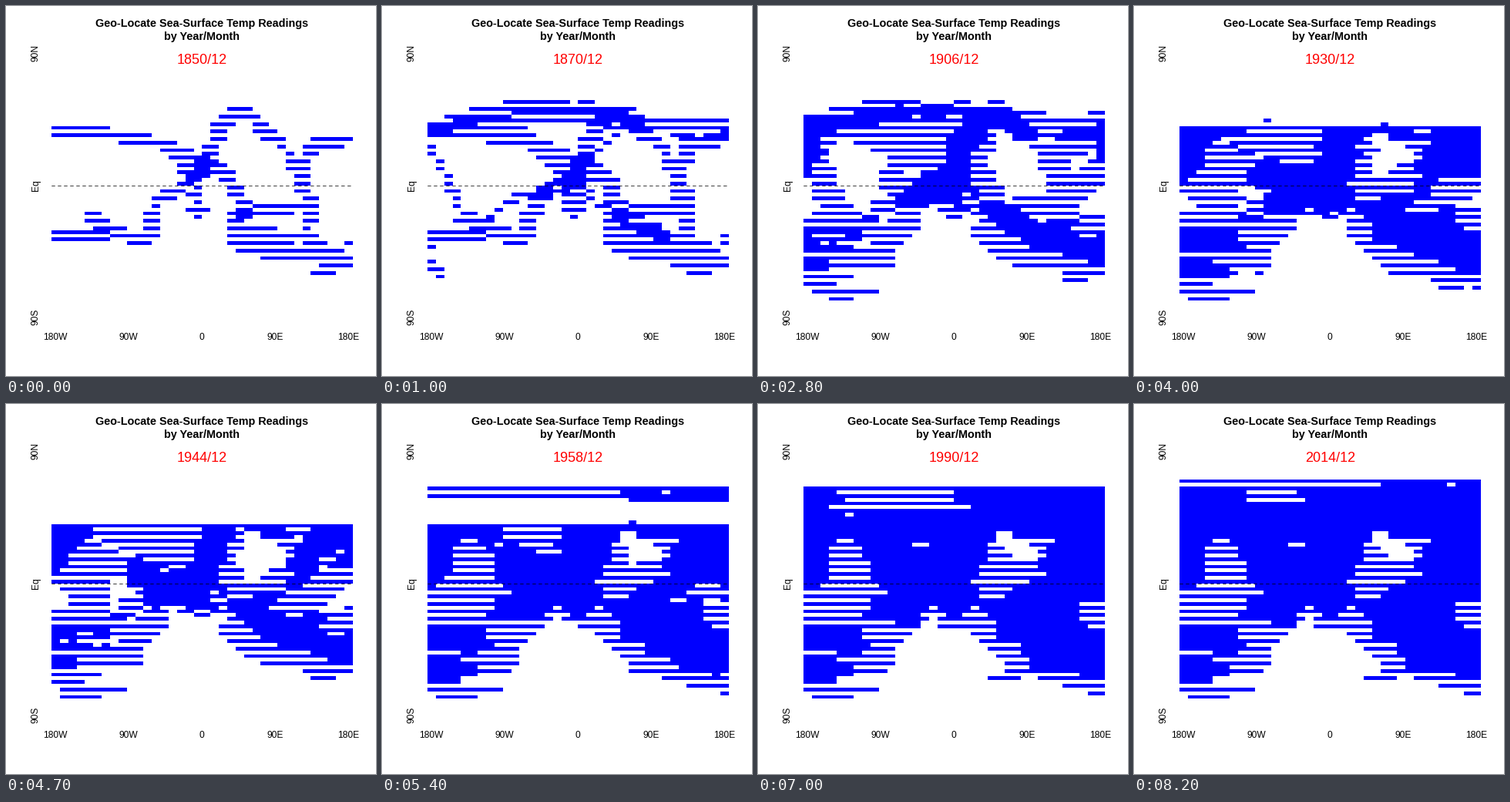
A matplotlib script that plays this animation: 480 by 480 pixels, repeating every 8300 ms.

```python
import numpy as np
import matplotlib.pyplot as plt
from matplotlib.animation import FuncAnimation
from matplotlib.path import Path

SIZE = 480
LEFT, RIGHT, TOP, BOTTOM = 59.04, 449.76, 59.04, 406.56
FRAMES, STEP_MS = 83, 100

# 5 degree cells, rows from south to north, columns from 180W to 180E
LON, LAT = np.meshgrid(np.arange(-177.5, 180, 5), np.arange(-87.5, 90, 5))

CONTINENTS = dict(
    africa=[(-16, 10), (-16, 25), (-5, 31), (32, 31), (41, 13), (50, 10),
            (41, -3), (36, -19), (30, -29), (18, -29), (14, -3), (9, 4),
            (4, 5), (-3, 9)],
    eurasia=[(28, 64), (29, 54), (1, 50), (1, 45), (29, 49), (40, 46),
             (35, 31), (40, 24), (66, 31), (75, 14), (80, 14), (83, 23),
             (95, 24), (102, 13), (106, 22), (115, 25), (115, 40), (130, 42),
             (135, 58), (160, 61), (181, 66), (181, 71), (55, 71), (16, 69)],
    north_america=[(-105, 20), (-100, 20), (-98, 30), (-81, 30), (-75, 40),
                   (-58, 52), (-62, 58), (-90, 71), (-160, 71), (-158, 62),
                   (-130, 59), (-123, 42), (-114, 31)],
    south_america=[(-75, 9), (-61, 9), (-50, 0), (-36, -5), (-41, -23),
                   (-56, -34), (-66, -36), (-69, -20), (-79, -3)],
    australia=[(116, -26), (121, -18), (143, -16), (149, -31), (116, -33)],
    greenland=[(-50, 62), (-42, 62), (-22, 72), (-60, 78)],
)

PLACES = dict(
    channel=(-5, 49), skagen=(6, 57), lofoten=(10, 67), barents=(40, 72),
    iceland=(-18, 57), banks=(-48, 46), america=(-72, 37), bermuda=(-65, 32),
    azores=(-28, 33), verde=(-25, 12), brazil=(-31, -10), plata=(-52, -38),
    atlantic=(-24, -29), cape=(18, -37), horn=(-68, -56), chile=(-80, -38),
    peru=(-90, -10), mexico=(-116, 10), california=(-123, 37),
    hawaii=(-157, 21), gibraltar=(0, 37), suez=(32, 33), aden=(46, 12),
    ceylon=(78, 5), mascarene=(65, -27), bengal=(86, -5), calcutta=(88, 18),
    sunda=(105, -7), canton=(115, 20), japan=(141, 35), leeuwin=(112, -34),
    kerguelen=(80, -46), tasman=(152, -38), zealand=(177, -38),
    southern=(-120, -57), aleutian=(180, 47), columbia=(-127, 46),
    panama=(-83, 7), caribbean=(-68, 18), polynesia=(-150, -17),
    coral=(157, -18),
)

# Shipping lanes by the year they open
LANES = {
    1800: ["america banks channel iceland", "america bermuda azores channel",
           "channel azores verde brazil atlantic cape",
           "brazil plata horn chile peru mexico california hawaii",
           "cape mascarene bengal calcutta", "mascarene sunda canton",
           "gibraltar suez", "america caribbean verde"],
    1854: ["cape kerguelen tasman zealand southern horn", "canton japan",
           "channel skagen"],
    1866: ["suez aden ceylon sunda", "aden bengal leeuwin",
           "zealand hawaii", "caribbean panama peru"],
    1880: ["skagen lofoten barents", "japan aleutian columbia",
           "verde cape"],
    1898: ["japan hawaii", "aden mascarene cape leeuwin tasman"],
    1912: ["panama polynesia zealand", "panama mexico",
           "polynesia coral tasman", "coral canton", "polynesia hawaii"],
}


def bump(x, centre, width):
    return np.exp(-((x - centre) / width) ** 2)


def ramp(x, start, length):
    return np.clip((x - start) / length, 0, 1)


def streaks(seed):
    """Noise that is a little longer east to west."""
    n = np.random.default_rng(seed).random(LON.shape)
    return (n + np.roll(n, 1, axis=1)) / 2


def distance(lane):
    """Distance from every cell to a lane, in cells, the short way round."""
    lons, lats = zip(*(PLACES[name] for name in lane.split()))
    points = list(zip(np.unwrap(lons, period=360), lats))
    best = np.full(LON.shape, np.inf)
    for (x0, y0), (x1, y1) in zip(points, points[1:]):
        dx, dy = x1 - x0, y1 - y0
        for turn in (-360, 0, 360):
            px, py = LON + turn - x0, LAT - y0
            t = np.clip((px * dx + py * dy) / (dx * dx + dy * dy), 0, 1)
            best = np.minimum(best, np.hypot(px - t * dx, py - t * dy))
    return best / 5


CELLS = np.column_stack([LON.ravel(), LAT.ravel()])
LAND = np.any([Path(c).contains_points(CELLS) for c in CONTINENTS.values()],
              axis=0).reshape(LON.shape)
DISTANCE = {year: np.min([distance(lane) for lane in lanes], axis=0)
            for year, lanes in LANES.items()}
STEADY = streaks(7)

# Year in which each southern cell is surveyed, latest in the south-east Pacific
SURVEY = (1950 + 75 * bump(LON, -125, 42) * (LON < 0)
          + 16 * (LAT > -55) + 55 * (LAT < -65))
ICE_EDGE = 64 + 15 * bump(LON, 18, 35)


def reach(year):
    """How far readings spread from a lane, in cells, with dips in wartime."""
    t = year - 1850
    wars = bump(year, 1917, 3) + bump(year, 1943, 3)
    return min(.95 + .006 * t + .00015 * t * t, 4.7) * (1 - .4 * wars)


def coverage(year):
    noise = .65 * STEADY + .35 * streaks(year)
    spread = reach(year) * (.7 + .6 * noise)
    ships = np.any([d < spread * ramp(year, opened, 10)
                    for opened, d in DISTANCE.items()], axis=0)
    # sailing ships went far south, steamers stay north of the westerlies
    south = -58 + 17 * ramp(year, 1912, 10) - 14 * ramp(year, 1958, 56)
    ships &= LAT > south + 5 * (noise - .5)
    surveyed = (year > SURVEY + 24 * (noise - .5)) & (abs(LAT + 57.5) < 13)
    return (ships | surveyed) & ~LAND & (LAT < ICE_EDGE)


def interlace(cover):
    """Each latitude takes two rows: the eastern half, then the western."""
    rows = np.empty((72, 36), bool)
    rows[0::2] = cover[:, 36:]
    rows[1::2] = cover[:, :36]
    return rows


# Map whole pixels to cells so that all edges stay hard
PX = np.arange(round(LEFT), round(RIGHT))
PY = np.arange(round(TOP), round(BOTTOM))
COL = ((PX + .5 - LEFT) / (RIGHT - LEFT) * 36).astype(int).clip(0, 35)
ROW = ((PY + .5 - TOP) / (BOTTOM - TOP) * 72).astype(int).clip(0, 71)


def picture(year):
    filled = interlace(coverage(year))[np.ix_(ROW, COL)]
    return np.where(filled[..., None], (0., 0., 1.), (1., 1., 1.))


plt.rcParams["font.family"] = "Liberation Sans"
fig = plt.figure(figsize=(SIZE / 72, SIZE / 72), dpi=72, facecolor="white")
ax = fig.add_axes([0, 0, 1, 1])
ax.axis("off")


def label(x, y, text, size=12, **style):
    return ax.text(x, y, text, fontsize=size, ha="center", va="baseline",
                   rotation_mode="anchor", **style)


image = ax.imshow(picture(1850), interpolation="nearest", aspect="auto",
                  extent=(PX[0], PX[-1] + 1, PY[-1] + 1, PY[0]))
ax.set(xlim=(0, SIZE), ylim=(SIZE, 0))
ax.plot([LEFT, RIGHT], [232.5, 232.5], color="black", lw=.75,
        dashes=(5.33, 5.33), dash_capstyle="round", zorder=3)

label(254, 27, "Geo-Locate Sea-Surface Temp Readings", 14.4, weight="bold")
label(254, 44, "by Year/Month", 14.4, weight="bold")
date = label(254.2, 75, "1850/12", 18, color="red")
for i, text in enumerate(["180W", "90W", "0", "90E", "180E"]):
    label(64 + 95 * i, 433, text)
for i, text in enumerate(["90N", "Eq", "90S"]):
    label(42, 61 + 171.3 * i, text, rotation=90)


def update(i):
    year = 1850 + 2 * i
    image.set_data(picture(year))
    date.set_text(f"{year}/12")
    return image, date


anim = FuncAnimation(fig, update, frames=FRAMES, interval=STEP_MS,
                     repeat=True, repeat_delay=0)
plt.show()
```
